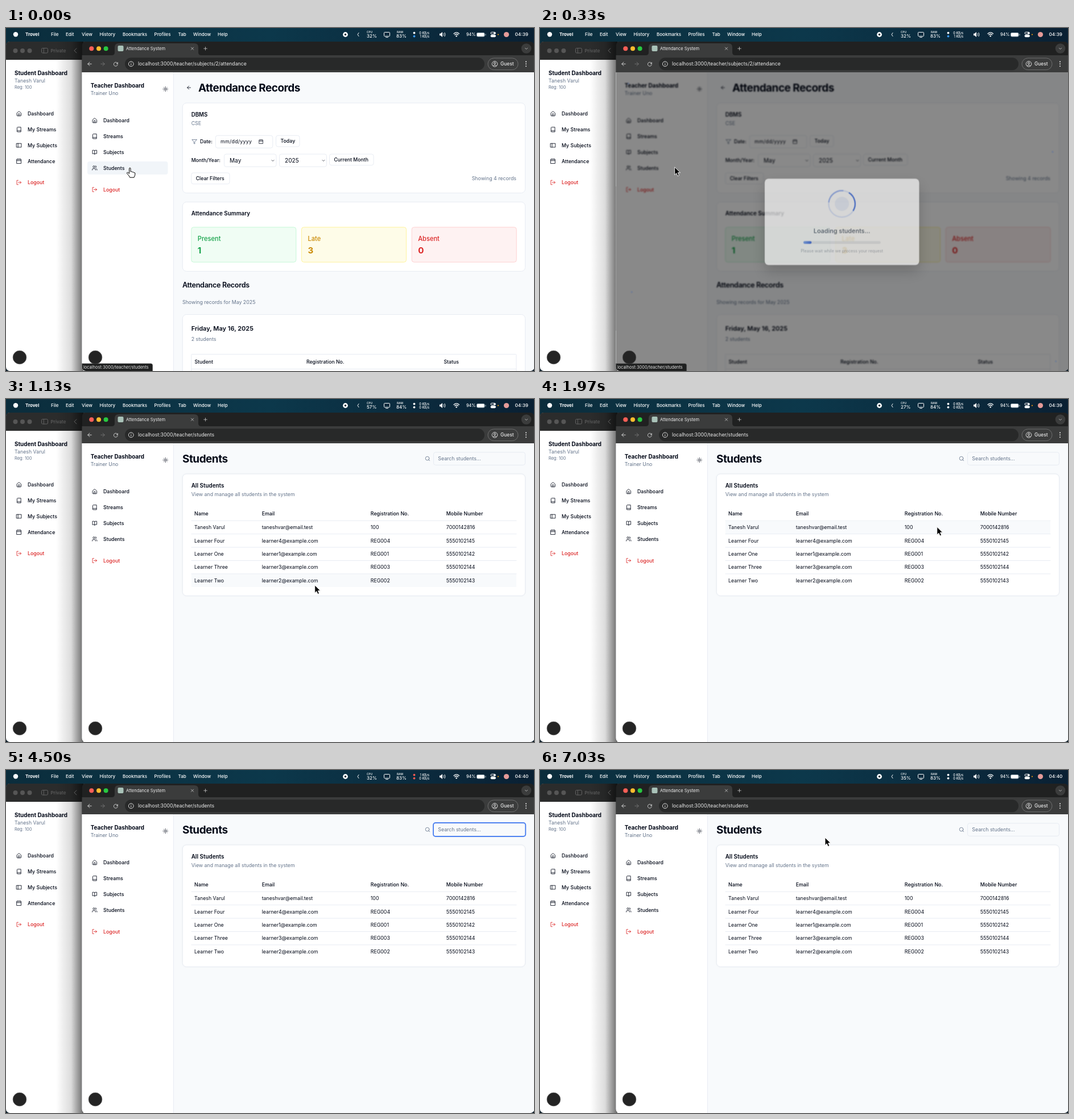
An HTML page that plays this animation: 928 px wide and 604 px high, repeating every 7.31 s.

```html
<!DOCTYPE html>
<html lang="en">
<head>
<meta charset="utf-8">
<title>Attendance System</title>
<style>
html, body { margin: 0; width: 100%; height: 100%; overflow: hidden; background: #0b1c28; }
svg { display: block; width: 928px; height: 604px; }
text { font-family: Inter, "Liberation Sans", sans-serif; white-space: pre; }
.icon { fill: none; stroke-width: 2; stroke-linecap: round; stroke-linejoin: round; }
.line { fill: none; stroke-linecap: round; stroke-linejoin: round; }
#card { filter: drop-shadow(0 .6px .8px rgba(0,0,0,.05)); }
#modal { transform-origin: 530.5px 341px; }
#panel { filter: drop-shadow(0 12px 12px rgba(0,0,0,.28)); }
</style>
</head>
<body>
<svg id="stage" viewBox="0 0 928 604" xmlns="http://www.w3.org/2000/svg"></svg>
<script>
const LOOP = 7310;
const INK = '#020817', MUTED = '#64748b', EDGE = '#e2e8f0', RED = '#dc2626';

// y is the vertical centre of the capitals
const text = (x, y, s, size = 8.8, weight = 400, fill = INK, more = '') =>
  `<text x="${x}" y="${(y + size * .36).toFixed(2)}" font-size="${size}" font-weight="${weight}" fill="${fill}" ${more}>${s}</text>`;
const rect = (x, y, w, h, fill, stroke = 'none', r = 0, more = '') =>
  `<rect x="${x}" y="${y}" width="${w}" height="${h}" rx="${r}" fill="${fill}" stroke="${stroke}" ${more}/>`;
const dot = (x, y, r, fill, more = '') => `<circle cx="${x}" cy="${y}" r="${r}" fill="${fill}" ${more}/>`;
const line = (d, stroke, w = 1) => `<path class="line" d="${d}" stroke="${stroke}" stroke-width="${w}"/>`;
const rule = (x1, x2, y) => line(`M${x1} ${y}H${x2}`, EDGE, .8);
const card = (y, h, more = '') => rect(310.3, y, 602.2, h, '#fff', EDGE, 7, `stroke-width=".8" ${more}`);
const button = (x, y, w, h) => rect(x, y, w, h, '#fff', EDGE, 3.6, 'stroke-width=".8"');

const ICONS = {
  home: 'M15 21v-8a1 1 0 0 0-1-1h-4a1 1 0 0 0-1 1v8M3 10a2 2 0 0 1 .7-1.5l7-6a2 2 0 0 1 2.6 0l7 6A2 2 0 0 1 21 10v9a2 2 0 0 1-2 2H5a2 2 0 0 1-2-2z',
  book: 'M4 19.5v-15A2.5 2.5 0 0 1 6.5 2H20v20H6.5a2.5 2.5 0 0 1 0-5H20',
  open: 'M12 7v14M3 18V4h6a3 3 0 0 1 3 3 3 3 0 0 1 3-3h6v14h-6a3 3 0 0 0-3 3 3 3 0 0 0-3-3z',
  users: 'M16 21v-2a4 4 0 0 0-4-4H6a4 4 0 0 0-4 4v2M13 7a4 4 0 1 1-8 0 4 4 0 0 1 8 0M22 21v-2a4 4 0 0 0-3-3.9M16 3.1a4 4 0 0 1 0 7.8',
  exit: 'M9 21H3V3h6M16 17l5-5-5-5M21 12H9',
  panel: 'M2 4h20v16H2zM8 4v16',
  calendar: 'M8 2v4M16 2v4M3 10h18M3 4h18v18H3z',
  sun: 'M16 12a4 4 0 1 1-8 0 4 4 0 0 1 8 0M12 2v2M12 20v2M5 5l1.4 1.4M17.6 17.6L19 19M2 12h2M20 12h2M6.4 17.6L5 19M19 5l-1.4 1.4',
  left: 'M12 19l-7-7 7-7M19 12H5',
  right: 'M12 5l7 7-7 7M5 12h14',
  search: 'M19 11a8 8 0 1 1-16 0 8 8 0 0 1 16 0M21 21l-4.3-4.3',
  funnel: 'M22 3H2l8 9.5V19l4 2v-8.5z',
  down: 'M6 9l6 6 6-6',
  close: 'M6 6l12 12M18 6L6 18',
  plus: 'M12 4v16M4 12h16',
  reload: 'M20 6v5h-5M20 11a8 8 0 1 0 0 4',
};
const icon = (name, x, y, stroke = INK, size = 10) =>
  `<path class="icon" d="${ICONS[name]}" stroke="${stroke}" transform="translate(${x - size / 2} ${y - size / 2}) scale(${size / 24})"/>`;

const nav = (x, y, items) => items.map(([name, label], i) =>
  icon(name, x, y + i * 27.8) + text(x + 15.2, y + i * 27.8, label, 8.8, 500)).join('');
const logout = (x, y) => icon('exit', x, y, RED) + text(x + 15.2, y, 'Logout', 8.8, 500, RED);
const badge = x => dot(x, 580, 11.8, '#242424', 'stroke="#555" stroke-width=".8"');

function menuBar() {
  const items = [[79, 'File'], [105, 'Edit'], [133, 'View'], [164.5, 'History'], [205, 'Bookmarks'],
    [260.5, 'Profiles'], [302.5, 'Tab'], [329, 'Window'], [372, 'Help']];
  const w = '#fff';
  return rect(0, 0, 928, 30, 'url(#bar)') + dot(17, 11.3, 4.2, w) +
    text(34, 11, 'Trovel', 8, 700, w) +
    items.map(([x, s]) => text(x, 11, s, 8, 500, w)).join('') +
    dot(596.5, 11.5, 4.4, w) + dot(596.5, 11.5, 1.7, '#0a2434') +
    line('M620 8.5l-2 3 2 3', w) + text(634, 7.7, 'CPU', 4.8, 500, w) + text(687, 7.7, 'RAM', 4.8, 500, w) +
    text(634, 14, '', 8, 500, w, 'id="cpu"') + text(686, 14, '', 8, 500, w, 'id="ram"') +
    rect(664.5, 7.5, 10, 7, 'none', w, 1) + line('M667.5 16.5h4', w) +
    dot(717.5, 8.7, 1.9, w, 'id="upDot"') + dot(717.5, 14.6, 1.9, w, 'id="downDot"') +
    text(744, 8.6, '', 5.6, 500, w, 'id="up" text-anchor="end"') +
    text(744, 14.6, '', 5.6, 500, w, 'id="down" text-anchor="end"') +
    `<path d="M762 9.7h2l3-2.7v9l-3-2.7h-2z" fill="#fff"/>` + line('M769 9.5q1.4 2 0 4M771 8.2q2.4 3.3 0 6.6', w, .9) +
    line('M787 10q4.7-4.2 9.4 0M788.8 12q2.9-2.6 5.8 0', w, 1.3) + dot(791.7, 14.2, 1.3, w) +
    text(809, 11.2, '94%', 7.2, 500, w) + rect(827.5, 8.5, 13.5, 6.5, w, '#9fb0ba', 1.8) + line('M843 10.8v2', '#9fb0ba') +
    rect(852, 7.3, 8.5, 3.4, 'none', w, 1.7) + dot(858.5, 9, 1.4, w) + rect(852, 12.3, 8.5, 3.4, w, w, 1.7) +
    dot(865, 11.5, 1.1, '#f59e0b') + dot(879.5, 11.5, 4.6, '#e59a98') +
    text(894.5, 11, '', 8.2, 500, w, 'id="clock"');
}

function backWindow() {
  const g = '#626262';
  return rect(0, 24, 150, 580, '#fff', 'none', 7) + `<path d="M0 56V30q0-6 6-6h144v32z" fill="#2b2c2c"/>` +
    [16.5, 29, 41.5].map(x => dot(x, 40, 4, '#565656')).join('') +
    rect(62.5, 35.5, 11, 8.5, 'none', g, 2) + line('M66.3 35.5v8.5', g) +
    text(78.5, 40, 'Private', 8.1, 500, g) + line('M124 35.8l-4 4 4 4', '#8a8a8a') +
    text(15, 79, 'Student Dashboard', 9.9, 700) + text(15, 93, 'Tanesh Varul', 8.8, 400, MUTED) +
    text(15, 104, 'Reg: 100', 7.5, 400, MUTED) +
    nav(22.8, 151, [['home', 'Dashboard'], ['book', 'My Streams'], ['panel', 'My Subjects'], ['calendar', 'Attendance']]) +
    logout(22.8, 272) + badge(24) + rect(88, 24, 48, 580, 'url(#shade)');
}

function toolbar() {
  const w = '#dcdcdc';
  return rect(133.5, 24, 795, 54, '#202121') +
    `<path d="M133 78V48h53q5 0 5-5v-9q0-7 7-7h133q7 0 7 7v9q0 5 5 5h586v30z" fill="#3b3c3c"/>` +
    [['#ff5f57', 150.3], ['#febc2e', 163], ['#28c840', 175.6]].map(([c, x]) => dot(x, 36.3, 4, c)).join('') +
    rect(196.5, 31, 10, 10, '#a9c2b8', 'none', 2) + text(211, 36, 'Attendance System', 7.5, 400, '#f1f1f1') +
    icon('close', 327.5, 36.2, w, 8.5) + icon('plus', 350.5, 36.2, w, 8.5) +
    dot(914.5, 36, 8.8, '#3b3c3c') + icon('down', 914.5, 36.3, w, 8.5) +
    icon('left', 147, 63.3, w, 11) + icon('right', 170, 63.3, '#747474', 11) +
    icon('reload', 192.8, 63.3, w, 10.5) + rect(209, 52.3, 632, 22, '#282929', 'none', 11) +
    dot(219.8, 63.3, 4.4, 'none', `stroke="${w}"`) + line('M219.8 63v2.3M219.8 61.1v.1', w) +
    text(232, 63.3, '', 8.7, 400, '#ececec', 'id="url"') +
    rect(847, 53, 53, 20.6, 'none', '#7c7c7c', 10.3, 'stroke-width=".8"') +
    dot(859, 63.3, 4.8, 'none', `stroke="${w}"`) + dot(859, 62, 1.6, 'none', `stroke="${w}"`) + line('M856 66.3q3-2.4 6 0', w) +
    text(869, 63.3, 'Guest', 8.4, 500, '#ececec') + [59.4, 63.3, 67.2].map(y => dot(914, y, 1.05, w)).join('');
}

function sidebar() {
  return rect(133, 78, 161.5, 530, '#fff') + line('M294.5 78V604', EDGE, .8) +
    text(148.7, 101, 'Teacher Dashboard', 9.9, 700) + text(148.7, 115, 'Trainer Uno', 8.8, 400, MUTED) +
    icon('sun', 280.2, 107.5) + rect(143, 235, 141.5, 23, '#f1f5f9', 'none', 4, 'id="navHover"') +
    nav(155.8, 163, [['home', 'Dashboard'], ['book', 'Streams'], ['open', 'Subjects'], ['users', 'Students']]) +
    logout(155.8, 284.5);
}

function recordsPage() {
  const stat = (x, label, n, bg, edge, c) => rect(x, 350.8, 184, 61.5, bg, edge, 4, 'stroke-width=".8"') +
    text(x + 11, 370.5, label, 11.1, 500, c) + text(x + 11, 391.5, n, 15.1, 700, c);
  const tight = s => `letter-spacing="${-.025 * s}"`;
  return icon('left', 321.5, 105) + text(338, 105, 'Attendance Records', 18.9, 700, INK, tight(18.9)) +
    card(132, 158.5) + text(325.7, 152.2, 'DBMS', 9.7, 600) + text(325.7, 167.5, 'CSE', 8.8, 400, MUTED) +
    icon('funnel', 331, 200.3, MUTED) + text(341, 200.3, 'Date:', 8.7, 500) + button(368.3, 189.3, 100.5, 22) +
    text(377, 200.3, 'mm/dd/yyyy', 8.8, 400, INK, 'letter-spacing=".3"') + icon('calendar', 448.3, 200, INK, 8.5) +
    button(474.5, 189.3, 41.5, 19.7) + text(482.5, 199, 'Today', 8.8, 500) +
    text(325.7, 233.3, 'Month/Year:', 8.7, 500) + button(383.5, 222, 91.5, 22.3) + text(393, 233.3, 'May', 10.1) +
    icon('down', 469, 233.5, INK, 8) + button(480.5, 222, 83, 22.3) + text(490, 233.3, '2025', 10.1) +
    icon('down', 558, 233.5, INK, 8) + button(568.5, 222, 77.5, 19.7) + text(576.5, 232, 'Current Month', 8.7, 500) +
    button(325.8, 255, 67.2, 19.7) + text(333.7, 265, 'Clear Filters', 8.7, 500) +
    text(897, 265, 'Showing 4 records', 8.8, 400, MUTED, 'text-anchor="end"') +
    card(306.4, 122) + text(325.7, 326.7, 'Attendance Summary', 9.9, 600) +
    stat(325.8, 'Present', 1, '#f0fdf4', '#bbf7d0', '#16a34a') + stat(519.5, 'Late', 3, '#fefce8', '#fef08a', '#ca8a04') +
    stat(713.2, 'Absent', 0, '#fef2f2', '#fecaca', RED) +
    text(310, 452.5, 'Attendance Records', 12.6, 600, INK, tight(12.6)) +
    text(310, 482.8, 'Showing records for May 2025', 8.8, 400, MUTED) +
    card(504.5, 140) + text(325.7, 529, 'Friday, May 16, 2025', 11, 600) + text(325.7, 548, '2 students', 8.8, 400, MUTED) +
    rect(325.8, 574.5, 571, 60, '#fff', EDGE, 1, 'stroke-width=".8"') + rule(326, 897, 600.5) +
    text(331.5, 587.7, 'Student', 8.7, 500) + text(528, 587.7, 'Registration No.', 8.7, 500) + text(769.5, 587.7, 'Status', 8.7, 500);
}

const STEP = 23.4, COLS = [331, 449.7, 640.8, 773.8];
const PEOPLE = [
  ['Tanesh Varul', 'taneshvar@email.test', '100', '7000142816'],
  ...[['Four', 4], ['One', 1], ['Three', 3], ['Two', 2]].map(([word, n]) =>
    ['Learner ' + word, `learner${n}@example.com`, 'REG00' + n, '555010214' + (n + 1)]),
];

function studentsPage() {
  const cells = (list, y, weight) => list.map((s, i) => text(COLS[i], y, s, 8.8, weight)).join('');
  return text(310, 105, 'Students', 18.9, 700, INK, 'letter-spacing="-.47"') + icon('search', 741, 105, MUTED) +
    rect(751.5, 93.8, 161, 22.5, '#f8fafc', EDGE, 3.6, 'stroke-width=".8"') +
    rect(751, 93, 162.2, 24, 'none', '#4f83f1', 4, 'id="ring" stroke-width="1.9"') +
    text(759.3, 105, '', 8.8, 400, MUTED, 'id="query"') + rect(759, 99.5, 1, 11, INK, 'none', 0, 'id="caret"') +
    card(132, 214.5, 'id="card"') + text(325.7, 152.2, 'All Students', 9.9, 600) +
    text(325.7, 167.7, 'View and manage all students in the system', 8.8, 400, MUTED) +
    cells(['Name', 'Email', 'Registration No.', 'Mobile Number'], 202, 500) + rule(326, 897, 214.3) +
    PEOPLE.map((p, i) => `<g class="row">${rect(326, 214.7 + i * STEP, 571, STEP - .8, '#f8fafc', 'none', 0, 'class="hover"')}` +
      (i ? rule(326, 897, 214.3 + i * STEP) : '') + cells(p, 226.1 + i * STEP, 400) + '</g>').join('');
}

function loader() {
  const arc = (color, turn) => `<path d="M0-24.2A24.2 24.2 0 0 1 24.2 0" transform="rotate(${turn})" fill="none" stroke="${color}" stroke-width="2.4"/>`;
  return rect(133, 78, 795, 530, '#000', 'none', 0, 'id="dim"') +
    `<g id="modal">${[[140, 88], [916, 213], [146, 470], [922, 597]].map(([x, y]) => dot(x, y, 2, '#3b63b5', 'opacity=".35"')).join('')}` +
    rect(389.3, 262.3, 282.6, 158, '#fff', 'none', 7, 'id="panel"') +
    dot(530.5, 308.3, 24.2, 'none', 'stroke="#d5e1fb" stroke-width="2.4"') +
    `<g id="spin">${arc('#2f62de', 0)}${arc('#8fabf0', 245)}</g>` + dot(530.5, 308.3, 12.8, '#e9effb', 'id="pulse"') +
    text(530.5, 357.7, 'Loading students...', 11.3, 500, '#334155', 'text-anchor="middle"') +
    rect(460, 376.6, 141.5, 5, '#e5e7eb', 'none', 2.5) + rect(460, 376.6, 0, 5, 'url(#fill)', 'none', 2.5, 'id="progress"') +
    text(530.5, 394.3, 'Please wait while we process your request', 7.5, 400, '#9ca3af', 'text-anchor="middle"') + '</g>';
}

const stop = (o, c, a = 1) => `<stop offset="${o}" stop-color="${c}" stop-opacity="${a}"/>`;
document.getElementById('stage').innerHTML = `<defs>
  <linearGradient id="bar">${stop(0, '#0b2d3c')}${stop(.5, '#0c384b')}${stop(1, '#0a2033')}</linearGradient>
  <linearGradient id="shade">${stop(0, '#000', 0)}${stop(.55, '#000', .14)}${stop(1, '#000', .58)}</linearGradient>
  <linearGradient id="fill">${stop(0, '#6d9bf5')}${stop(1, '#1d4fd7')}</linearGradient>
  <clipPath id="window"><rect x="133.5" y="24" width="795" height="580" rx="7"/></clipPath>
  <clipPath id="view"><rect x="133.5" y="78" width="795" height="526"/></clipPath></defs>
  ${menuBar()}${backWindow()}
  <g clip-path="url(#window)">${rect(133, 78, 795, 530, '#f8fafc')}
    <g clip-path="url(#view)"><g id="page">${sidebar()}<g id="records">${recordsPage()}</g><g id="students">${studentsPage()}</g></g>${loader()}</g>
    ${toolbar()}${badge(157)}
    <g id="status">${rect(130, 591, 127.5, 16, '#1f2020', '#484848', 3, 'stroke-width=".7"')}${text(136, 597.8, 'localhost:3000/teacher/students', 7.45, 400, '#e6e6e6')}</g>
  </g>
  <g id="cursor" stroke-linejoin="round">
    <path id="arrow" d="M0 0v13.6l3.1-2.9 2.1 4.9 2.5-1.1-2.1-4.8h4.2z" fill="#000" stroke="#fff" stroke-width=".9"/>
    <path id="hand" d="M-2 10l-3-3.5q-1.4-2 .6-2.4l3 2.2V-2q0-1.8 1.2-1.8T1-2v5q2.5-1 3 .8 2.2-.8 2.7 1Q9 4.3 9 6.2q0 4-2 7H-.3z" transform="translate(-1 0)" fill="#fff" stroke="#000"/>
    <path id="beam" class="line" d="M-2.5-6.5Q0-6.5 0-5V5Q0 6.5-2.5 6.5M2.5-6.5Q0-6.5 0-5M0 5Q0 6.5 2.5 6.5" stroke="#111"/>
  </g>`;

const el = Object.fromEntries([...document.querySelectorAll('[id]')].map(n => [n.id, n]));
const rows = [...document.querySelectorAll('.row')];
const bars = [...document.querySelectorAll('.hover')];

// time, x, y of the pointer tip
const PATH = [
  [0, 219, 250], [200, 218, 246], [280, 218, 245], [340, 240, 245], [630, 541, 253.5], [780, 562, 262],
  [1000, 546, 308], [1130, 543, 328], [1300, 505, 318], [1530, 540, 295], [1750, 361, 228], [2000, 742, 225],
  [2230, 600, 300], [2400, 345, 325], [2600, 460, 371], [2830, 692, 318.5], [3000, 640, 314], [3150, 463, 295],
  [3540, 782, 110], [3830, 782, 110], [3970, 786, 112], [5600, 786, 110], [5850, 640, 180], [6100, 452, 218],
  [6330, 570, 214], [6450, 610, 165], [6700, 539, 120], [6870, 539, 120], [7030, 501, 119], [LOOP, 501, 119],
];
// start, cpu, ram, up, down, dot colours
const STATS = [
  [0, 32, 83, 0, 1, '#fff', '#3b9cff'], [500, 57, 84, 0, 0, '#fff', '#fff'], [1900, 27, 84, 0, 0, '#fff', '#fff'],
  [3870, 32, 83, 1, 0, '#ff5a52', '#ff5a52'], [4700, 32, 83, 0, 0, '#fff', '#fff'], [6000, 35, 83, 0, 0, '#fff', '#fff'],
];
const TYPED = '70001', KEYS = [4530, 4620, 4720, 4820, 4970], ERASE = [5230, 5290, 5350, 5410, 5470];

const ramp = (t, a, b) => Math.min(1, Math.max(0, (t - a) / (b - a)));
const show = (node, on) => node.setAttribute('visibility', on ? 'inherit' : 'hidden');
const passed = (times, t) => times.filter(x => t >= x).length;

function pointer(t) {
  const i = Math.max(1, PATH.findIndex(p => p[0] > t));
  const [a, b] = [PATH[i - 1], PATH[i]], k = ramp(t, a[0], b[0]);
  return [a[1] + (b[1] - a[1]) * k, a[2] + (b[2] - a[2]) * k];
}

function drawStats(t) {
  const [, cpu, ram, up, down, c1, c2] = STATS.filter(s => s[0] <= t).pop();
  el.cpu.textContent = cpu + '%';
  el.ram.textContent = ram + '%';
  el.up.textContent = up + ' KB/s';
  el.down.textContent = down + ' KB/s';
  el.upDot.setAttribute('fill', c1);
  el.downDot.setAttribute('fill', c2);
  el.clock.textContent = t < 2600 ? '04:39' : '04:40';
}

function drawLoader(t) {
  const p = ramp(t, 140, 430) * (1 - ramp(t, 860, 1110));
  el.page.style.filter = p ? `blur(${(2 * Math.max(0, p - .3) / .7).toFixed(2)}px)` : 'none';
  el.dim.setAttribute('opacity', .7 * p);
  el.modal.style.opacity = p;
  el.modal.style.transform = `scale(${.885 + .115 * p})`;
  el.spin.setAttribute('transform', `translate(530.5 308.3) rotate(${(t - 270) * .522})`);
  el.pulse.setAttribute('r', 12.4 + .5 * Math.sin(t / 160));
  el.progress.setAttribute('width', 141.5 * ramp(t, 250, 1010));
}

function drawSearch(t, focused) {
  const value = TYPED.slice(0, passed(KEYS, t) - passed(ERASE, t));
  el.query.textContent = value || 'Search students...';
  el.query.setAttribute('fill', value ? INK : MUTED);
  const blinkOff = (t >= 4170 && t < 4530) || (t >= 5970 && t < 6470);
  show(el.caret, focused && !blinkOff);
  el.caret.setAttribute('x', value ? 759.8 + el.query.getComputedTextLength() : 759);
  let count = 0;
  rows.forEach((row, i) => {
    const match = PEOPLE[i][3].startsWith(value);
    show(row, match);
    count += match;
  });
  el.card.setAttribute('height', 214.5 - STEP * (5 - count));
}

function drawPointer(t) {
  const [x, y] = pointer(t);
  const inField = t > 1000 && x > 751 && x < 913 && y > 93 && y < 117;
  el.cursor.setAttribute('transform', `translate(${x} ${y})`);
  show(el.cursor, t < 3970 || t >= 5600);
  show(el.hand, t < 200);
  show(el.beam, inField);
  show(el.arrow, t >= 200 && !inField);
  const [, hy] = pointer(Math.max(0, t - 80));
  const over = t > 900 && (t < 3970 || t >= 5600) ? Math.floor((hy - 214.3) / STEP) : -1;
  bars.forEach((bar, i) => bar.setAttribute('opacity', +(i === over)));
}

function draw(t) {
  const moved = t >= 860, focused = t >= 3540 && t < 6500;
  show(el.records, !moved);
  el.students.setAttribute('display', moved ? 'inline' : 'none');
  el.url.textContent = 'localhost:3000/teacher/' + (moved ? 'students' : 'subjects/2/attendance');
  show(el.navHover, t < 240);
  show(el.status, t < 430);
  show(el.ring, focused);
  drawStats(t);
  drawLoader(t);
  drawSearch(t, focused);
  drawPointer(t);
}

const start = performance.now();
function tick() {
  draw((performance.now() - start) % LOOP);
  requestAnimationFrame(tick);
}
tick();
</script>
</body>
</html>
```
